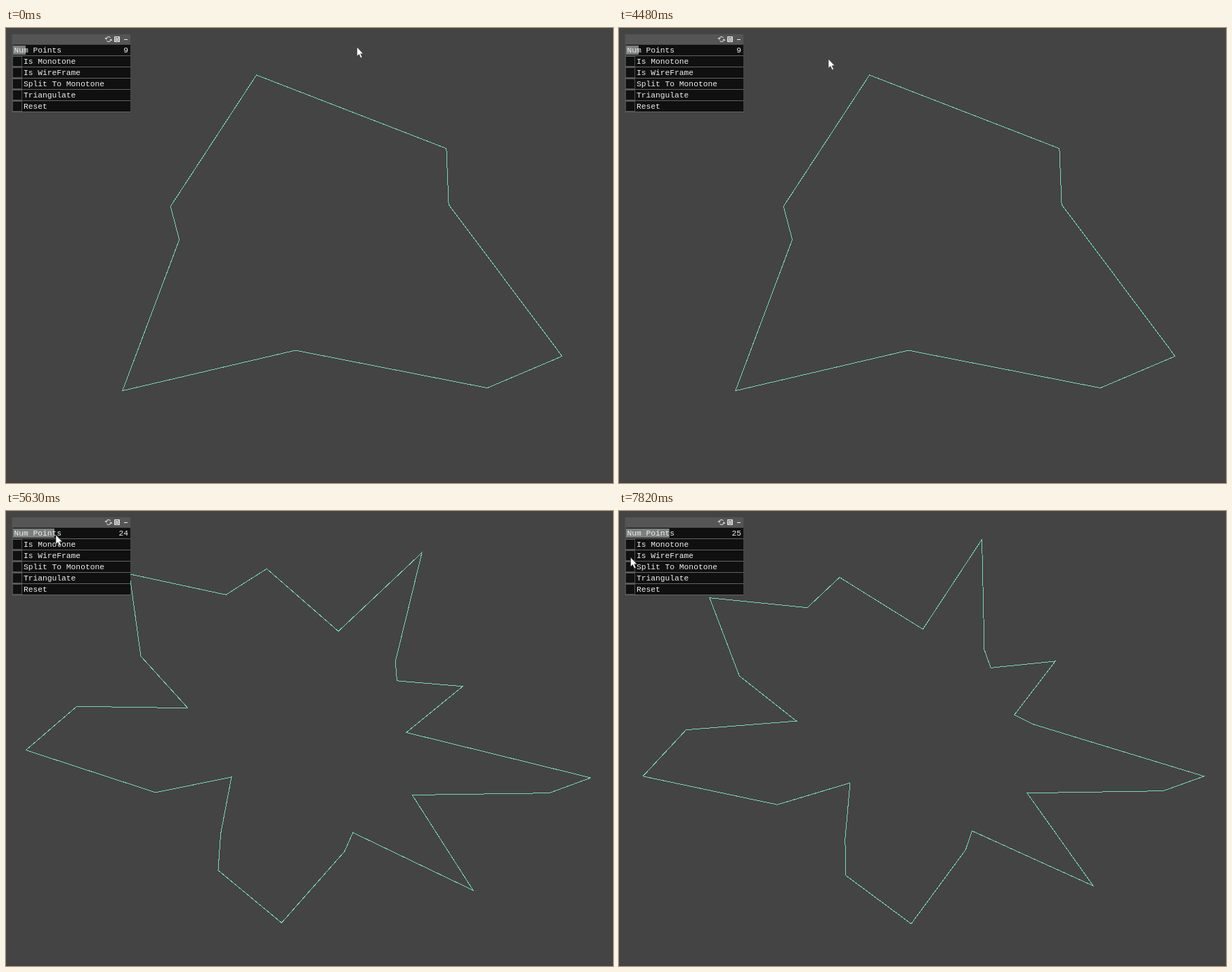
These frames come from a looping animation (864x648 px, 8000 ms). An HTML page:

```html
<!DOCTYPE html>
<html lang="en">
<head>
<meta charset="utf-8">
<title>Polygon panel</title>
<style>
  html, body { margin: 0; width: 100%; height: 100%; overflow: hidden; background: #444; }
  svg { display: block; width: 864px; height: 648px; }
  text { font: 11.27px "Liberation Mono", "DejaVu Sans Mono", monospace; fill: #eee; white-space: pre; }
  #outline { fill: none; stroke: #74d6b6; stroke-width: 1; shape-rendering: crispEdges; }
  .icon { fill: none; stroke: #eee; stroke-width: 1; }
</style>
</head>
<body>
<svg viewBox="0 0 864 648">
  <rect width="864" height="648" fill="#444"/>
  <rect y="646" width="864" height="2" fill="#483f44"/>
  <polygon id="outline"/>
  <g id="panel">
    <rect x="8" y="9" width="169" height="111" fill="#4c4c4c"/>
    <rect x="9" y="9" width="168" height="14" fill="#555"/>
    <path class="icon" d="M142.3 15.5a3.6 3.6 0 0 1 6.4-1.6M149.7 16.5a3.6 3.6 0 0 1-6.4 1.6M141 14l1.4 2 2-1.2M151 18l-1.4-2-2 1.2"/>
    <path class="icon" d="M154.5 12.5h7v7h-7zM156.5 12.5v2.5h3.5v-2.5M156 19.5v-2h4v2M155 16h6"/>
    <path class="icon" d="M168 16.5h5"/>
    <rect x="10" y="24" width="167" height="15" fill="#101010"/>
    <rect id="fill" x="10" y="25" height="13" fill="#7b7f7d"/>
    <text x="11.5" y="34.5">Num Points</text>
    <text id="count" x="174" y="34.5" text-anchor="end"></text>
  </g>
  <path id="cursor" d="M0 0V13.3L3 10.6L5.4 15.8L7.6 14.8L5.3 9.8H9.2Z" fill="#fff" stroke="#333" stroke-width=".7"/>
</svg>
<script>
const $ = id => document.getElementById(id);
const LOOP = 8000, TAU = Math.PI * 2;
const clamp = v => Math.max(0, Math.min(1, v));

function add(tag, attrs, label) {
  const el = document.createElementNS("http://www.w3.org/2000/svg", tag);
  for (const k in attrs) el.setAttribute(k, attrs[k]);
  if (label) el.textContent = label;
  $("panel").append(el);
}

["Is Monotone", "Is WireFrame", "Split To Monotone", "Triangulate", "Reset"].forEach((label, i) => {
  const y = 40 + 16 * i;
  add("rect", { x: 9, y: y - 1, width: 168, height: 1, fill: "#636363" });
  add("rect", { x: 10, y: y + 1, width: 12, height: 13, fill: "#101010" });
  add("rect", { x: 23, y, width: 154, height: 15, fill: "#101010" });
  add("text", { x: 25, y: y + 10.7 }, label);
});
add("rect", { x: 9, y: 119, width: 168, height: 1, fill: "#636363" });

// Corner i lies (i + jitter) / count of a turn round an ellipse, at its own reach (both in thousandths).
const jitter = [699, 120, 413, 404, 734, 134, 438, 841, 344, 797, 340, 798, 702, 240, 208,
  376, 428, 283, 750, 619, 648, 224, 360, 665, 318, 892, 642, 500, 500];
const reach = [941, 824, 418, 856, 436, 508, 814, 652, 510, 308, 560, 937, 781, 424, 665,
  937, 691, 761, 482, 898, 441, 384, 554, 319, 371, 539, 724, 640, 720];

function outline(count) {
  return reach.slice(0, count).map((r, i) => {
    const a = (i + jitter[i] / 1000) / count * TAU;
    return [432.5 + 0.432 * r * Math.cos(a), 324.5 + 0.324 * r * Math.sin(a)];
  }).join(" ");
}

// The slider is dragged up from 9 to 29 in short ticks, slowing down, then back to 25.
const DRAG = 4812, TICK = 68, RISE = 1228;
function countAt(t) {
  const p = clamp(Math.floor((t - DRAG) / TICK) * TICK / RISE);
  const back = clamp((t - 6230) / 170);
  return Math.round(29 - 20 * (1 - p) ** 1.25 - 4 * back);
}
const fillEnd = n => 10 + (n - 2.4) * 2.73;

// Pointer stops [time, x, y]; without a place it is away.
const stops = [[0, 499.5, 27], [1440], [4480, 298, 44], [4740, 30, 34],
  [6890, 65, 46], [7090, 32, 67], [7290, 5, 78], [7490, 16.5, 66]];

function pointerAt(t, n) {
  if (t >= DRAG && t < 6890) return [fillEnd(n) + 2, t < 6230 ? 34 : 36];
  return stops.findLast(s => s[0] <= t).slice(1);
}

function draw(now) {
  const t = now % LOOP;
  const n = countAt(t);
  const pos = pointerAt(t, n);
  $("outline").setAttribute("points", outline(n));
  $("fill").setAttribute("width", fillEnd(n) - 10);
  $("count").textContent = n;
  $("cursor").style.display = pos.length ? "" : "none";
  if (pos.length) $("cursor").setAttribute("transform", `translate(${pos})`);
}

const start = performance.now();
function tick() {
  draw(performance.now() - start);
  requestAnimationFrame(tick);
}
tick();
</script>
</body>
</html>
```
